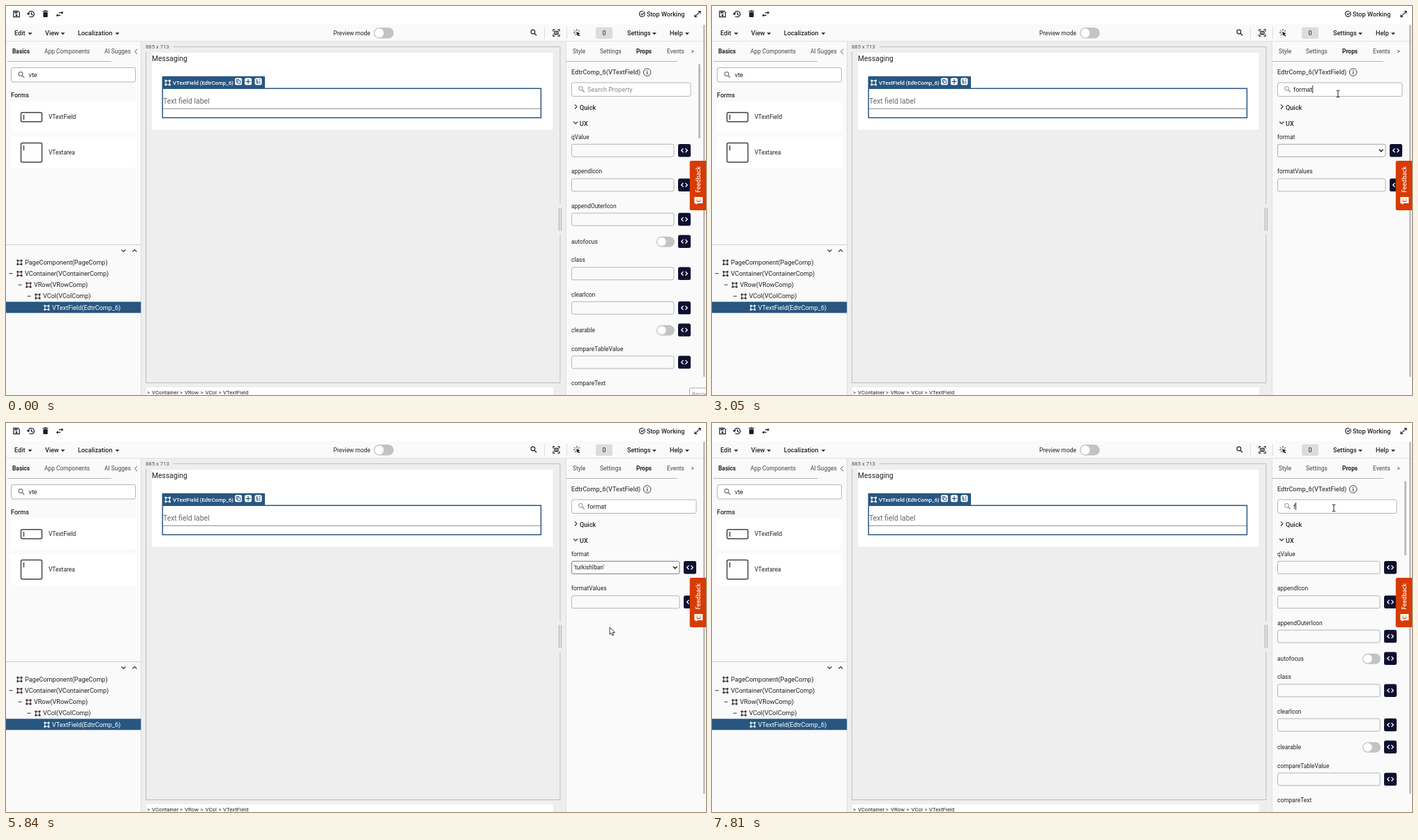
An HTML page for the animation above (8000 ms loop, 1003 by 558 pixels).

```html
<!DOCTYPE html>
<html lang="en">
<head>
<meta charset="utf-8">
<title>Property editor</title>
<style>
html, body { margin: 0; width: 100%; height: 100%; overflow: hidden; background: #fff; }
svg { display: block; width: 1003px; height: 558px; font-family: Roboto, sans-serif; }
text { white-space: pre; }
.ico { fill: none; stroke: #1c1c2b; stroke-width: 1.2; }
</style>
</head>
<body>
<svg id="stage" viewBox="0 0 1003 558"></svg>
<script>
const INK = '#222', PANEL = '#fafafa', BLUE = '#285680', NAVY = '#0f1030';
const S = 8.43, M = 9.08;

// y is the middle of the capitals
const text = (x, y, str, size = S, weight = 400, fill = INK, extra = '') =>
  `<text x="${x}" y="${y + size * 0.355}" font-size="${size}" font-weight="${weight}" fill="${fill}" ${extra}>${str}</text>`;
const rect = (x, y, w, h, fill, r = 0, extra = '') =>
  `<rect x="${x}" y="${y}" width="${w}" height="${h}" rx="${r}" fill="${fill}" ${extra}/>`;
const box = (x, y, w, h, stroke = '#b4b4b4', fill = '#fff', r = 2.5, sw = 1) =>
  rect(x, y, w, h, fill, r, `stroke="${stroke}" stroke-width="${sw}"`);
const line = (d, stroke = INK, sw = 1, fill = 'none') =>
  `<path d="${d}" fill="${fill}" stroke="${stroke}" stroke-width="${sw}"/>`;
const circle = (x, y, r, fill, extra = '') => `<circle cx="${x}" cy="${y}" r="${r}" fill="${fill}" ${extra}/>`;
const at = (x, y, body) => `<g transform="translate(${x} ${y})">${body}</g>`;
const group = (id, body, extra = '') => `<g id="${id}" ${extra}>${body}</g>`;

const caretDown = (x, y) => line(`M${x - 3} ${y - 1.3}h6l-3 3z`, 'none', 0, INK);
const lens = (x, y, color = '#777', sw = 1.2) =>
  circle(x - 1, y - 1, 2.9, 'none', `stroke="${color}" stroke-width="${sw}"`) + line(`M${x + 1.2} ${y + 1.2}l3 3`, color, sw + 0.2);
const nodeIcon = (x, y, color, s = 1) => `<g transform="translate(${x} ${y}) scale(${s})">` +
  line('M-2.6 -2.6h5.2v5.2h-5.2z', color, 1) +
  [[-4, -4], [1.6, -4], [-4, 1.6], [1.6, 1.6]].map(([a, b]) => rect(a, b, 2.4, 2.4, color)).join('') + '</g>';
const toggle = (x, y, w, h) => rect(x, y, w, h, '#c3c3c3', h / 2) + circle(x + h / 2, y + h / 2, h / 2 - 1.3, '#fff');
const codeButton = (x, y) => rect(x, y - 9, 18, 18.5, NAVY, 2.5) +
  line(`M${x + 7.5} ${y - 2.6}l-2.8 2.8l2.8 2.8M${x + 10.5} ${y - 2.6}l2.8 2.8l-2.8 2.8`, '#fff', 1.3);
const input = (y, w) => box(810.5, y - 8.7, w, 18, '#b4b4b4', PANEL);

function topBars() {
  const menus = [[12, 'Edit', 34.5], [56, 'View', 81.5], [103, 'Localization', 159.5], [890, 'Settings', 929], [951, 'Help', 976]];
  return rect(0, 26, 1003, 25, PANEL) + line('M0 50.5H1003', '#e2e2e2') +
    at(15, 11.5, line('M-4.2 -4.2h6.6l1.9 1.9v6.5h-8.5z', '#1c1c2b', 1.2) + rect(-2.8, -3, 4.4, 2, '#1c1c2b') + circle(0, 1.8, 1.4, '#1c1c2b')) +
    at(36, 11.5, line('M-4 0a4.2 4.2 0 1 1 1.3 3.1M-5.8 -1.2l1.8 2l1.9 -2M0.4 -2.4v2.7l2 1.3', '#1c1c2b', 1.2)) +
    at(56.5, 11.5, rect(-3.2, -2.8, 6.4, 7.4, '#1c1c2b', 0.8) + rect(-3.9, -4.6, 7.8, 1.2, '#1c1c2b') + rect(-1.4, -5.2, 2.8, 1, '#1c1c2b')) +
    at(77, 11.5, line('M-1 -1.9h5M-4 1.9h5', '#1c1c2b', 1.2) + line('M2.6 -4.2l2.6 2.3l-2.6 2.3zM-2.6 -0.4l-2.6 2.3l2.6 2.3z', 'none', 0, '#1c1c2b')) +
    at(911.5, 11.3, line('M3.8 -1a4 4 0 1 1 -2 -2.5M-1.9 -0.4l1.7 1.7l4.2 -4.2', '#1c1c2b', 1.1)) +
    text(918, 11.3, 'Stop Working', M, 500) +
    at(991, 11.5, line('M-3.8 3.8l7.6 -7.6M0.8 -4h3.2v3.2M-0.8 4h-3.2v-3.2', '#1c1c2b', 1.2)) +
    menus.map(([x, s, c]) => text(x, 39.2, s, 9.1, 500) + caretDown(c, 39.5)).join('') +
    text(469, 39.2, 'Preview mode') + toggle(527, 31, 28.5, 15.6) +
    lens(756, 38, '#1c1c2b', 1.1) + line('M771.5 30v17M803.5 30v17', '#ddd') +
    at(788.5, 38.5, line('M-4.6 -2v-2.6h2.6M2 -4.6h2.6v2.6M4.6 2v2.6h-2.6M-2 4.6h-2.6v-2.6', '#1c1c2b', 1.1) +
      rect(-2.6, -2.2, 5.2, 4.4, 'none', 0.6, 'stroke="#1c1c2b" stroke-width="1.2"') + rect(-1.2, -0.6, 2.4, 1.4, '#1c1c2b')) +
    at(818, 38, line('M0 -5v2.6M-4 -3.2l1.9 1.9M-4.8 0.4h2.5M4 -3.2l-1.9 1.9M-3 4l1.6 -1.8', '#1c1c2b', 1) +
      line('M-0.8 -1l5.4 2.2l-2.2 1l1.9 2.2l-1.2 1l-1.9 -2.2l-1 2z', 'none', 0, '#1c1c2b')) +
    rect(845, 30.5, 24, 16.5, '#dcdcdc', 2.5) + text(857, 39, '0', M, 400, INK, 'text-anchor="middle"');
}

function leftPanel() {
  const tree = [[27, 'PageComponent(PageComp)'], [27, 'VContainer(VContainerComp)'], [40, 'VRow(VRowComp)'],
    [53, 'VCol(VColComp)'], [66, 'VTextField(EdtrComp_6)']];
  return rect(0, 51, 193, 507, PANEL) + line('M193.5 51V558', '#ddd') +
    text(9, 65.5, 'Basics', S, 700) + text(55, 65.5, 'App Components', S, 400, '#444') + text(141, 65.5, 'AI Sugges', S, 400, '#444') +
    line('M188 61.8l-3.6 3.7l3.6 3.7', '#555') + line('M2 79.5H151', '#b5b5b5') +
    box(7.5, 88.5, 178, 20.5) + lens(22, 98.5) + text(32.5, 98.8, 'vte', M) +
    text(7, 127.5, 'Forms', M, 500) +
    rect(7, 137, 179, 44.5, '#fff') + rect(7, 187.5, 179, 45, '#fff') +
    box(21.5, 152.7, 30, 13.2, '#444', '#fff', 2, 1.5) + line('M25.5 156v7', '#333', 1.3) + text(61, 159.5, 'VTextField') +
    box(21.5, 196.5, 30, 27.5, '#444', '#fff', 2, 1.5) + line('M25.5 200v7', '#333', 1.3) + text(61, 210.3, 'VTextarea') +
    line('M0 342.5H193', '#cfcfcf') + line('M165.5 349.5l3 3l3 -3M181.3 352.5l3 -3l3 3', '#333', 1.1) +
    rect(0, 424.3, 193.3, 16, BLUE) +
    tree.map(([x, s], i) => {
      const y = 367.5 + i * 16.25, c = i === 4 ? '#fff' : INK;
      const dash = i > 0 && i < 4 ? line(`M${x - 22.5} ${y}h5`, '#333') : '';
      return dash + nodeIcon(x - 7.6, y + 0.3, i === 4 ? '#fff' : '#3a2a32') + text(x, y, s, M, 400, c);
    }).join('');
}

function canvasArea() {
  const crumbs = [[202, '&gt;'], [209, 'VContainer'], [249, '&gt;'], [256, 'VRow'], [278.5, '&gt;'], [285.5, 'VCol'], [304.5, '&gt;'], [311, 'VTextField']];
  return rect(194, 51, 608, 507, '#eee') +
    text(200, 58.5, '885 x 713', 7.78, 400, '#555') +
    line('M240 58.5H794V284M794 328V540.5H200.5V66', '#bdbdbd') +
    line('M792.5 289.5v33M795.5 289.5v33', '#b0b0b0', 1.2) +
    rect(209, 67, 574.5, 110.5, '#fff') + text(209, 75.3, 'Messaging', 10.38) +
    text(225, 136, 'Text field label', 10.38, 400, '#666') + line('M225 147.3H766', '#8c8c8c') +
    box(224.3, 118.3, 542.2, 42, BLUE, 'none', 0, 1.5) +
    rect(223.6, 100.7, 147.4, 17.6, BLUE, 1) + nodeIcon(231.7, 110, '#fff', 1.05) +
    text(239, 109.8, 'VTextField (EdtrComp_6)', 7.78, 500, '#fff') +
    [333, 347, 361.5].map(x => box(x - 4.6, 103.7, 9.2, 9.2, '#fff', '#fff', 1.5, 0.8)).join('') +
    at(333, 108.3, line('M-2.8 1.6v-4.4h4M-1.2 -1.2h4v4h-4z', BLUE)) +
    at(347, 108.3, line('M-3.4 0h6.8M0 -3.4v6.8', BLUE, 1.3)) +
    at(361.5, 108.3, line('M-3 -2.4h2M-2 -2v4.4h2M-2 0.2h2M1 -2.4h2M1 0.2h2M1 2.4h2', BLUE, 1.2)) +
    rect(201, 547, 583, 11, '#fff') + crumbs.map(([x, s]) => text(x, 553.8, s, 7.78)).join('');
}

function rightPanel() {
  const full = [['qValue', 188], ['appendIcon', 237.5], ['appendOuterIcon', 286.8], ['class', 364.5], ['clearIcon', 413.8],
    ['compareTableValue', 491.7]];
  const switches = [['autofocus', 338], ['clearable', 465]];
  return rect(802, 51, 201, 507, PANEL) + line('M802.5 51V558', '#ddd') +
    text(812, 65.5, 'Style', S, 400, '#444') + text(851, 65.5, 'Settings', S, 400, '#444') +
    text(903, 65.5, 'Props', S, 700) + text(947, 65.5, 'Events', S, 400, '#444') + text(981.5, 65.3, '&gt;', S, 400, '#444') +
    line('M803 79.5H962', '#b5b5b5') +
    text(810, 95, 'EdtrComp_6(VTextField)', M, 500, '#4a4a4a') +
    circle(918.7, 95, 5.3, 'none', 'stroke="#444"') + rect(918.1, 94.2, 1.2, 3.7, '#444') + rect(918.1, 92, 1.2, 1.3, '#444') +
    `<rect id="field" x="810.5" y="110" height="19.5" rx="2.5" fill="#fff" stroke="#b4b4b4"/>` + lens(824.5, 119.3, '#888', 1) +
    rect(833, 112.7, 27.3, 13.6, '#abcbf3', 0, 'id="selection"') +
    text(833, 119.6, '', M, 400, INK, 'id="query"') + rect(0, 114, 0.9, 11, INK, 0, 'id="caret"') +
    line('M815 141.3l3 3.1l-3 3.1M813.2 166l3 3l3 -3', '#333', 1.1) +
    text(822, 145.5, 'Quick', M, 500) + text(822, 168.3, 'UX', M, 500) +
    group('full', full.map(([s, y]) => text(810, y, s) + input(y + 19, 146.5) + codeButton(963, y + 19)).join('') +
      switches.map(([s, y]) => text(810, y, s) + toggle(932, y - 7.3, 26, 15) + codeButton(963, y - 0.5)).join('') +
      text(810, 541, 'compareText') + rect(992, 83, 3, 107, '#bdbdbd', 1.5)) +
    group('filtered', text(810, 188, 'format') +
      '<rect id="select" x="810.5" y="198.3" width="154.5" height="18" rx="2.5" fill="#fafafa"/>' +
      text(813.5, 207.4, "'turkishIban'", 8.3, 400, INK, 'id="value"') +
      line('M956 205.8l2.8 2.8l2.8 -2.8', INK, 1.5) + codeButton(971, 207) +
      text(810, 237.5, 'formatValues') + input(256.5, 154.5) + codeButton(971, 256.5)) +
    rect(999, 27, 2.6, 505, '#bcbcbc', 1);
}

const OPTIONS = ['', 'number', 'regex', 'creditcard', 'phone', 'turkishMobilePhone', 'turkishPhoneWithCountryCode',
  'internationalPhone', 'email', 'multipleEmails', 'ipaddress', 'iban', 'turkishIban', 'onlyAlphabetic', 'alphaNumeric', 'bigdecimal'];
const ROW = 10.75, MENU_TOP = 219.4;

function overlays() {
  return group('menu', rect(811, 219, 153.6, 173.5, '#f9f9f9', 0, 'style="filter:drop-shadow(0 1px 1.5px #0008)"') +
      rect(811, 0, 153.4, ROW, '#6b6b6b', 0, 'id="hover"') +
      OPTIONS.map((s, i) => s && text(813.5, MENU_TOP + (i + 0.5) * ROW + 0.5, `'${s}'`, S, 400, INK, 'class="option"')).join('')) +
    group('tip', box(979.5, 548, 40, 20, '#aaa', '#fff', 1) + text(983, 556.2, 'Record', 8, 400, '#888')) +
    rect(979.7, 222, 30, 71, '#d83b01', 2.5) +
    `<text transform="translate(995 267.5) rotate(-90)" font-family="Open Sans, sans-serif" font-size="8.2" font-weight="600" fill="#fff">Feedback</text>` +
    at(992.3, 279, line('M-6 -5h12v9h-7l-3 2v-2h-2z', 'none', 0, '#fff') + line('M-2.8 0q2.8 3 5.6 0', '#d83b01', 1.1) +
      circle(-2, -2, 0.7, '#d83b01') + circle(2, -2, 0.7, '#d83b01')) +
    group('toast', rect(782.5, 38, 191.3, 56, '#2fca67', 5, 'style="filter:drop-shadow(0 1px 5px #0004)"') +
      circle(807, 67, 7.6, '#0c2014') + line('M803.2 67.2l2.7 2.7l5 -5', '#2fca67', 1.6) +
      text(823.5, 57, 'Code Saved', 9.4, 700, '#0c2014') + text(823.5, 73.3, 'Property has been changed', 9.7, 400, '#0c2014') +
      line('M950.8 63.6l6 6m0 -6l-6 6', '#1c8043', 1.3)) +
    group('cursor', circle(-1, -0.5, 7, '#f4ee3c', 'id="click" opacity=".85"') +
      group('beam', line('M-2.4 -4.8h1.6l0.8 0.8l0.8 -0.8h1.6M0 -4.2v8.4M-2.4 4.8h1.6l0.8 -0.8l0.8 0.8h1.6', '#222', 1)) +
      group('arrow', line('M0 0v10.4l2.4 -2.2l1.7 3.8l1.7 -0.8l-1.7 -3.6h3.3z', '#222', 0.9, '#fff')));
}

document.getElementById('stage').innerHTML = topBars() + leftPanel() + canvasArea() + rightPanel() + overlays();

const $ = id => document.getElementById(id);
const show = (id, on) => $(id).setAttribute('visibility', on ? 'visible' : 'hidden');
const within = (t, a, b) => t >= a && t < b;
const options = [...document.querySelectorAll('.option')];

// first step, last step, number of steps, destination
const MOVES = [
  [70, 670, 10, 894, 122], [3050, 3050, 1, 897, 126], [3120, 3460, 6, 899, 206],
  [4000, 4680, 11, 849, 324], [4750, 4750, 1, 852, 331], [4820, 4960, 3, 853, 347],
  [5160, 5300, 3, 856, 354], [5770, 5840, 2, 865, 293], [5910, 6520, 10, 891, 122]];
const TYPING = [[0, ''], [1130, 'f'], [1790, 'fo'], [1920, 'for'], [2250, 'form'], [2390, 'forma'], [2590, 'format'], [7810, 'f']];
const CLICKS = [[860, 930], [3660, 3730], [5500, 5570], [6800, 6870], [6940, 7000]];
const CARET = [[860, 1130], [1260, 3120], [6800, 6870], [7810, 8000]];

function pointer(t) {
  let x = 1006, y = 548;
  for (const [a, b, n, tx, ty] of MOVES) {
    if (t < a) break;
    const k = n === 1 ? 1 : Math.min(n, Math.floor((t - a) / (b - a) * (n - 1) + 0.01) + 1);
    const p = k / n, e = Math.sin(p * Math.PI / 2);
    x += (tx - x) * e;
    y += (ty - y) * e;
  }
  return [x, y];
}

function render(t) {
  const query = TYPING.filter(([at]) => t >= at).pop()[1];
  const filtered = within(t, 2050, 7810);
  const [x, y] = pointer(t);
  const inField = y > 110 && y < 130;

  show('full', !filtered);
  show('filtered', filtered);
  show('tip', t < 70);
  $('field').setAttribute('width', filtered ? 178.5 : 170.5);
  $('query').textContent = query || 'Search Property';
  $('query').setAttribute('fill', query ? INK : '#8a8a8a');
  show('selection', within(t, 6870, 7810));
  show('caret', CARET.some(([a, b]) => within(t, a, b)));
  $('caret').setAttribute('x', 833 + (query ? $('query').getComputedTextLength() : 0));

  $('select').setAttribute('stroke', within(t, 3660, 6870) ? '#77778a' : '#a6a6a6');
  show('value', within(t, 5570, 7810));
  show('menu', within(t, 3730, 5570));
  const row = Math.max(0, Math.min(15, Math.floor((y - MENU_TOP) / ROW)));
  $('hover').setAttribute('y', MENU_TOP + row * ROW);
  options.forEach((el, i) => el.setAttribute('fill', i + 1 === row ? '#fff' : INK));

  const fade = Math.max(0, Math.min(1, (t - 6040) / 270, (7210 - t) / 200));
  $('toast').setAttribute('opacity', fade);

  show('cursor', t >= 70);
  $('cursor').setAttribute('transform', `translate(${x} ${y})`);
  $('beam').setAttribute('display', inField ? 'inline' : 'none');
  $('arrow').setAttribute('display', inField ? 'none' : 'inline');
  $('click').setAttribute('display', CLICKS.some(([a, b]) => within(t, a, b)) ? 'inline' : 'none');
}

const start = performance.now();
function tick() {
  render((performance.now() - start) % 8000);
  requestAnimationFrame(tick);
}
tick();
</script>
</body>
</html>
```
